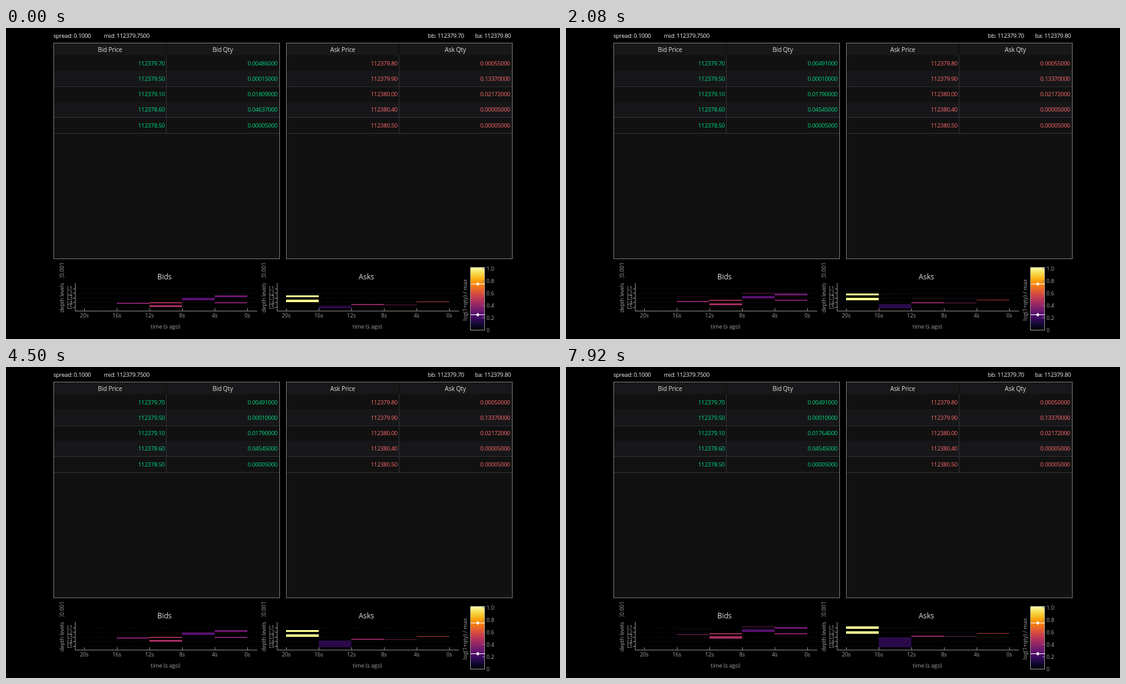
These frames come from a looping animation (900 by 506 pixels, 8 s). An HTML page with a canvas:

```html
<!DOCTYPE html>
<html lang="en">
<head>
<meta charset="utf-8">
<title>Order book depth</title>
<style>
html, body { margin: 0; width: 100%; height: 100%; overflow: hidden; background: #000; }
canvas { display: block; width: 900px; height: 506px; }
</style>
</head>
<body>
<canvas id="stage" width="900" height="506"></canvas>
<script>
const ctx = document.getElementById('stage').getContext('2d');
const LOOP = 8000, FPS = 12, DRIFT = 1.56;
const FONT = '"Open Sans", "Noto Sans", sans-serif';
const CELL = 53, TOP = 422, BOTTOM = 456;
const AXIS = '#8c8c8c', LABEL = '#a0a0a0', BRIGHT = '#f4f4f4', GRID = '#32323a';

function rect(x, y, w, h, color) {
  ctx.fillStyle = color;
  ctx.fillRect(x, y, w, h);
}

function text(str, x, y, { size = 9.5, color = LABEL, align = 'left', gap = -0.3, up = false } = {}) {
  ctx.save();
  ctx.translate(x, y);
  if (up) ctx.rotate(-Math.PI / 2);
  ctx.font = `${size}px ${FONT}`;
  ctx.letterSpacing = gap + 'px';
  ctx.textAlign = align;
  ctx.fillStyle = color;
  ctx.fillText(str, 0, size * 0.357);
  ctx.restore();
}

// value of a stepwise series: [start, value, start, value, ...]
function at(series, t) {
  let value = series[1];
  for (let i = 0; i < series.length; i += 2) if (t >= series[i]) value = series[i + 1];
  return value;
}

const bidRows = [
  ['112379.70', [0, '0.00486000', 1250, '0.00491000']],
  ['112379.50', [0, '0.00015000', 330, '0.00010000']],
  ['112379.10', [0, '0.01809000', 330, '0.00005000', 1250, '0.01790000', 4580, '0.01764000']],
  ['112378.60', [0, '0.04637000', 330, '0.04545000']],
  ['112378.50', [0, '0.00005000']]
];
const askRows = [
  ['112379.80', [0, '0.00055000', 2920, '0.00050000']],
  ['112379.90', [0, '0.13370000']],
  ['112380.00', [0, '0.02172000']],
  ['112380.40', [0, '0.00005000']],
  ['112380.50', [0, '0.00005000']]
];

function table(x, w, side, rows, color, t) {
  const mid = x + 183;
  rect(x, 25, w, 350, '#111111');
  rect(x, 25, w, 19, '#18181a');
  rows.forEach((row, i) => {
    const y = 44 + i * 25.3;
    if (i % 2) rect(x, Math.round(y), w, 25, '#17171a');
    rect(x, Math.round(y + 25.3), w, 1, GRID);
    const style = { color, align: 'right' };
    text(row[0], mid - 2, y + 13.2, style);
    text(at(row[1], t), x + 364, y + 13.2, style);
  });
  rect(mid, 25, 1, 19, '#0a0a0a');
  rect(mid, 44, 1, 127, GRID);
  const head = { size: 10, gap: -0.15, color: '#dcdcdc', align: 'center' };
  text(side + ' Price', x + 92, 35.5, head);
  text(side + ' Qty', x + 275, 35.5, head);
  ctx.strokeStyle = '#77777c';
  ctx.lineWidth = 1;
  ctx.strokeRect(x + 0.5, 24.5, w, 351);
}

// bands: column, centre at the start of the loop, height, colour
const bidBands = [
  [1, 448, 1.6, '#7c1f66'], [1, 440, 0.8, '#1c0a18'],
  [2, 446.7, 2, '#98294f'], [2, 452.6, 3.6, '#a52c60'],
  [3, 441, 4, '#57106e'], [3, 435, 0.9, '#5c1a58'],
  [4, 436.6, 2.6, '#6a176e'], [4, 446.7, 2, '#7d1e69']
];
const askBands = [
  [0, 436.6, 3.6, '#fcff90'], [0, 444.2, 3.6, '#fcff90'],
  [1, 437, 0.8, '#14081a'],
  [1, 468, 32, '#2a0a48'],
  [2, 450, 2, '#8a2462'], [2, 444, 0.8, '#1e0c1c'],
  [3, 450.6, 0.9, '#5c1a40'], [3, 444, 0.8, '#14081a'],
  [4, 445.5, 0.8, '#a83a30']
];

function heatmap(x, title, bands, t) {
  const left = x - 15, right = x + 281, shift = DRIFT * t / 1000;
  for (let i = 0; i < 5; i++) {
    const y = 423.5 + i * 7.5;
    for (let gx = left + 2; gx < right; gx += 4) rect(gx, Math.round(y), 1, 1, '#1c1c2c');
    text('L' + (i + 1), x - 19, y + 0.5, { size: 8.5, align: 'right', gap: -0.2 });
    rect(left - 3, Math.round(y), 3, 1, AXIS);
  }
  ctx.save();
  ctx.beginPath();
  ctx.rect(x, TOP, CELL * 5, BOTTOM - TOP);
  ctx.clip();
  // bands cover whole pixel rows, so the thinnest ones blink while drifting
  for (const [col, y, h, color] of bands) {
    const y0 = Math.round(y - h / 2 - shift), y1 = Math.round(y + h / 2 - shift);
    rect(x + col * CELL, y0, CELL, y1 - y0, color);
  }
  const flash = (t > 570 && t < 660) || (t > 5410 && t < 5495);
  if (flash) rect(x, Math.floor(434.5 - shift), CELL * 5, 1, '#f0ec80');
  ctx.restore();

  rect(left, 415, 1, 46, AXIS);
  rect(left, 460, right - left, 1, AXIS);
  for (let i = 0; i < 6; i++) {
    rect(x + i * CELL, 456, 1, 5, AXIS);
    text(20 - i * 4 + 's', x + i * CELL, 468, { size: 9, align: 'center', gap: -0.2 });
  }
  text(title, x + 130.5, 404.5, { size: 11.8, color: '#e0e0e0', align: 'center', gap: 0 });
  text('time (s ago)', x + 132, 486, { size: 9, align: 'center', gap: -0.05 });
  text('depth levels', x - 36, 439, { size: 9, align: 'center', gap: -0.2, up: true });
  ctx.save();
  ctx.beginPath();
  ctx.rect(x - 44, 381, 20, 25);
  ctx.clip();
  text('(0.001', x - 36, 407, { size: 9, gap: 0, up: true });
  ctx.restore();
}

function colorBar() {
  const grad = ctx.createLinearGradient(0, 491, 0, 390);
  ['#000004', '#160b39', '#420a68', '#6a176e', '#932667', '#bc3754',
    '#dd513a', '#f37819', '#fca50a', '#f6d746', '#fcffa4']
    .forEach((c, i) => grad.addColorStop(i / 10, c));
  rect(755, 390, 23, 102, grad);
  ctx.strokeStyle = '#969696';
  ctx.lineWidth = 1;
  ctx.strokeRect(754.5, 389.5, 23, 102);
  for (const y of [416, 466]) {
    rect(755, y, 23, 1, '#fff');
    ctx.beginPath();
    ctx.moveTo(766.5, y - 2.5);
    ctx.lineTo(769.5, y + 0.5);
    ctx.lineTo(766.5, y + 3.5);
    ctx.lineTo(763.5, y + 0.5);
    ctx.fill();
  }
  for (let i = 0; i < 6; i++) {
    const y = 491 - i * 20;
    rect(774, y, 4, 1, AXIS);
    text(i ? (i / 5).toFixed(1) : '0', 780.5, y + 0.5, { size: 9, gap: 0 });
  }
  text('log(1+qty) / max', 746, 442.5, { size: 9, align: 'center', gap: 0, up: true });
}

function draw(t) {
  rect(0, 0, 900, 506, '#000');
  const top = { color: BRIGHT };
  text('spread: 0.1000', 77, 13, top);
  text('mid: 112379.7500', 159, 13, top);
  text('bb: 112379.70', 685.5, 13, top);
  text('ba: 112379.80', 762, 13, top);
  table(77, 367, 'Bid', bidRows, '#00d880', t);
  table(455, 367, 'Ask', askRows, '#ff6b6b', t);
  heatmap(127, 'Bids', bidBands, t);
  heatmap(455, 'Asks', askBands, t);
  colorBar();
}

const start = performance.now();
function tick() {
  const t = (performance.now() - start) % LOOP;
  draw(Math.floor((t + 4) * FPS / 1000) * 1000 / FPS);
  requestAnimationFrame(tick);
}
tick();
</script>
</body>
</html>
```
